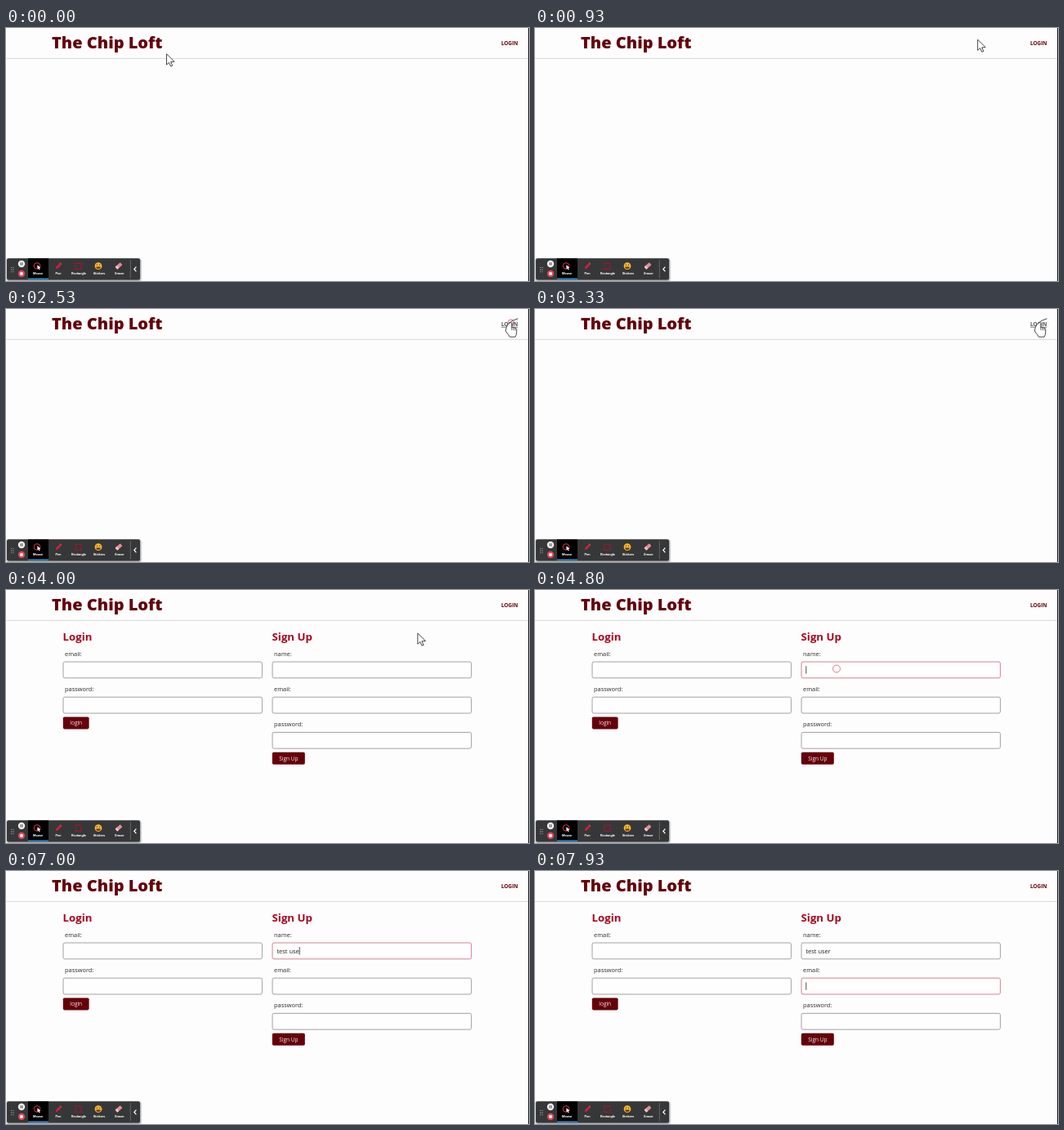
These frames come from a looping animation (640x310 px, 8 s). An HTML page:

```html
<!DOCTYPE html>
<html lang="en">
<head>
<meta charset="utf-8">
<title>Blog sign up</title>
<style>
  html, body { margin: 0; width: 100%; height: 100%; overflow: hidden; background: #fdfdfd; }
  svg { display: block; width: 640px; height: 310px; font-family: "Open Sans", "Noto Sans", sans-serif; }
  text { white-space: pre; }
  .title { font-size: 20px; font-weight: 800; fill: #65000b; }
  .link { font-size: 6.4px; font-weight: 700; fill: #65000b; }
  .link.hover { fill: #555; }
  .head { font-size: 13.2px; font-weight: 700; fill: #a9041c; }
  .label { font-size: 7.4px; fill: #2b2b2b; }
  .value { font-size: 7.5px; fill: #222; }
  .field { fill: #fefefe; stroke: #8c8c8c; stroke-width: .8; }
  .field.focus { stroke: #cb6276; }
  .button { fill: #65000b; }
  .caption { font-size: 6.5px; fill: #f6eeee; text-anchor: middle; }
  .tool { font: 700 4px Roboto, sans-serif; fill: #fff; text-anchor: middle; }
  .cursor { fill: #fff; stroke: #333; stroke-width: .9; stroke-linejoin: round; }
</style>
</head>
<body>
<svg viewBox="0 0 640 310">
  <defs>
    <filter id="shadow" x="-10%" y="-30%" width="120%" height="160%">
      <feGaussianBlur stdDeviation="1.2"/>
    </filter>
  </defs>
  <rect width="640" height="310" fill="#fdfdfd"/>
  <path d="M0 37.3H639" stroke="#d9d9d9"/>
  <text class="title" x="56" y="25">The Chip Loft</text>
  <text class="link" id="link" x="606" y="21">LOGIN</text>
  <path id="underline" d="M606 22.3H626.5" stroke="#555" stroke-width=".7"/>

  <g id="page"></g>
  <path id="caret" stroke="#222" stroke-width=".8"/>
  <path d="M639.5 0V310" stroke="#222"/>

  <rect x="1" y="283" width="164" height="27" rx="2" fill="#000" opacity=".45" filter="url(#shadow)"/>
  <rect x="1" y="282.3" width="163" height="26.2" rx="2" fill="#363738"/>
  <path d="M6.7 293V299.5M9 293V299.5" stroke="#aaa" stroke-width="1.1" stroke-dasharray="1.1 1.5"/>
  <circle cx="19" cy="289" r="4.2" fill="#f4f4f4"/>
  <path d="M18 287.2V290.8M20 287.2V290.8" stroke="#333" stroke-width=".9"/>
  <circle cx="19" cy="301" r="4.2" fill="#e0455a"/>
  <rect x="17.3" y="299.3" width="3.4" height="3.4" rx=".4" fill="#fff"/>
  <rect x="27" y="282.3" width="25" height="25.7" fill="#000"/>
  <rect x="27" y="306.6" width="25" height="1.4" fill="#1e96e8"/>
  <circle cx="38" cy="291.5" r="3.8" fill="none" stroke="#e0344a" stroke-width="1"/>
  <path d="M38.4 290.2v5.4l1.3-1.1 1 2 1-.5-1-1.9 1.8-.2z" fill="#fff"/>
  <path d="M60.6 295.2l.8-2.8 3.7-3.7 2.1 2.1-3.8 3.7z" fill="#cf1f3c"/>
  <path d="M65.4 288.2l1-1 2 2-1 1z" fill="#e63a50"/>
  <rect x="85.1" y="288.3" width="7" height="7" fill="none" stroke="#b5122e" stroke-width="1.3" stroke-dasharray="2.4 1"/>
  <circle cx="113" cy="291.7" r="4.4" fill="#f5b82e"/>
  <path d="M110.3 292.4h5.4a2.7 2.7 0 0 1-5.4 0z" fill="#7a3418"/>
  <path d="M111.4 289.6v1.3M114.6 289.6v1.3" stroke="#4d2b12" stroke-width=".9"/>
  <g transform="rotate(-42 138 291.5)">
    <rect x="133.8" y="289.4" width="8.4" height="4.2" rx=".8" fill="#e58a9b"/>
    <rect x="133.8" y="289.4" width="2.8" height="4.2" rx=".8" fill="#f3c3cb"/>
  </g>
  <g id="tools"></g>
  <path d="M152.3 284V306.5" stroke="#777" stroke-width=".7"/>
  <path d="M159.4 292.6l-2.6 2.9 2.6 2.9" fill="none" stroke="#fff" stroke-width="1.2"/>

  <circle id="ring" fill="none" stroke="#dc3c5a" stroke-width="1"/>
  <path id="arrow" class="cursor" d="M0 0V13.2L3 10.5 5.1 15.2 7.2 14.3 5.1 9.7 9.6 9.5Z"/>
  <g id="hand" class="cursor">
    <path d="M-1.2 .9Q0-.6 1.2.9V6.2Q2.5 5.2 3.3 6.5 4.6 5.7 5.4 7 6.9 6.6 7.2 8.2V12.5Q7 15.5 5.6 17.8H-1.2Q-2.4 15.2-4.8 12.6L-6.2 10.5Q-6-.4+9-4.7 9L-1.2 11.6Z"/>
    <path d="M1.2 6.2V9.6M3.3 6.5V9.8M5.4 7V10" fill="none" stroke-width=".7"/>
  </g>
</svg>
<script>
const LOOP = 8000, PAGE_AT = 3530, FOCUS_AT = 4700, TAB_AT = 7560;
const TEXT = 'test user', TYPE_AT = 5760, KEY_GAP = 160;
const RING_TIME = 560;
const $ = id => document.getElementById(id);

const field = (id, x, y, label) => `
  <text class="label" x="${x + 2}" y="${y - 7.2}">${label}:</text>
  <rect class="field" id="${id}" x="${x}" y="${y}" width="243.4" height="19.8" rx="2"/>`;
const button = (x, y, w, label) => `
  <rect class="button" x="${x}" y="${y}" width="${w}" height="15" rx="1.8"/>
  <text class="caption" x="${x + w / 2}" y="${y + 10}">${label}</text>`;
const head = (x, label) => `<text class="head" x="${x}" y="62.3">${label}</text>`;

$('page').innerHTML =
  head(69.6, 'Login') +
  field('loginEmail', 70, 88, 'email') + field('loginPass', 70, 131.2, 'password') +
  button(69.8, 155.4, 31.8, 'login') +
  head(325.6, 'Sign Up') +
  field('name', 326, 88, 'name') + field('email', 326, 131.2, 'email') +
  field('pass', 326, 174.4, 'password') +
  button(325.8, 198.7, 40, 'Sign Up') +
  '<text class="value" id="value" x="331.4" y="101"></text>';

$('tools').innerHTML = ['Mouse', 'Pen', 'Rectangle', 'Stickers', 'Eraser']
  .map((name, i) => `<text class="tool" x="${39 + i * 25}" y="302.3">${name}</text>`).join('');

// Pointer tip: time, x, y
const path = [
  [0, 196.5, 31.8], [60, 196.5, 31.8], [930, 541.7, 14.2], [1600, 619.6, 15.8],
  [1930, 619.6, 15.8], [2000, 617.6, 16.4], [3600, 617.6, 16.4], [4450, 369, 96.5], [LOOP, 369, 96.5]
];
const clicks = [[2480, 618, 16.5], [FOCUS_AT, 369, 96.5]];

function tipAt(t) {
  const i = path.findIndex(p => p[0] > t);
  const [t0, x0, y0] = path[i - 1], [t1, x1, y1] = path[i];
  const u = (t - t0) / (t1 - t0), k = u * u * (3 - 2 * u);
  return [x0 + (x1 - x0) * k, y0 + (y1 - y0) * k];
}

const show = (id, on) => $(id).setAttribute('visibility', on ? 'visible' : 'hidden');

function set(id, attrs) {
  for (const key in attrs) $(id).setAttribute(key, attrs[key]);
}

function drawPointer(t) {
  const [x, y] = tipAt(t);
  const hover = x > 605 && x < 628 && y > 12 && y < 24;
  const inField = t > PAGE_AT && x > 326 && x < 570 && y > 88 && y < 108;
  $('link').classList.toggle('hover', hover);
  show('underline', hover);
  show('hand', hover);
  show('arrow', !hover && !inField);
  for (const id of ['hand', 'arrow']) set(id, { transform: `translate(${x} ${y})` });

  const click = clicks.find(c => t >= c[0] && t < c[0] + RING_TIME);
  show('ring', click);
  if (click) {
    const u = (t - click[0]) / RING_TIME;
    set('ring', { cx: click[1], cy: click[2], r: 2.5 + 11 * u, opacity: .85 * (1 - u) });
  }
}

function drawForm(t) {
  $('page').setAttribute('display', t >= PAGE_AT ? 'inline' : 'none');
  const tabbed = t >= TAB_AT;
  $('name').classList.toggle('focus', t >= FOCUS_AT && !tabbed);
  $('email').classList.toggle('focus', tabbed);

  const typed = Math.max(0, Math.min(TEXT.length, Math.floor((t - TYPE_AT) / KEY_GAP) + 1));
  $('value').textContent = TEXT.slice(0, typed);

  // The caret blinks from the latest key press
  const lastKey = tabbed ? TAB_AT : typed ? TYPE_AT + (typed - 1) * KEY_GAP : FOCUS_AT;
  show('caret', t >= FOCUS_AT && (t - lastKey) % 1060 < 530);
  const x = tabbed || !typed ? 331.8 : 331.8 + $('value').getComputedTextLength();
  set('caret', { d: `M${x} ${tabbed ? 136.4 : 93.2}v9.4` });
}

function draw(t) {
  drawPointer(t);
  drawForm(t);
}

const start = performance.now();
function tick() {
  draw((performance.now() - start) % LOOP);
  requestAnimationFrame(tick);
}
tick();
</script>
</body>
</html>
```
